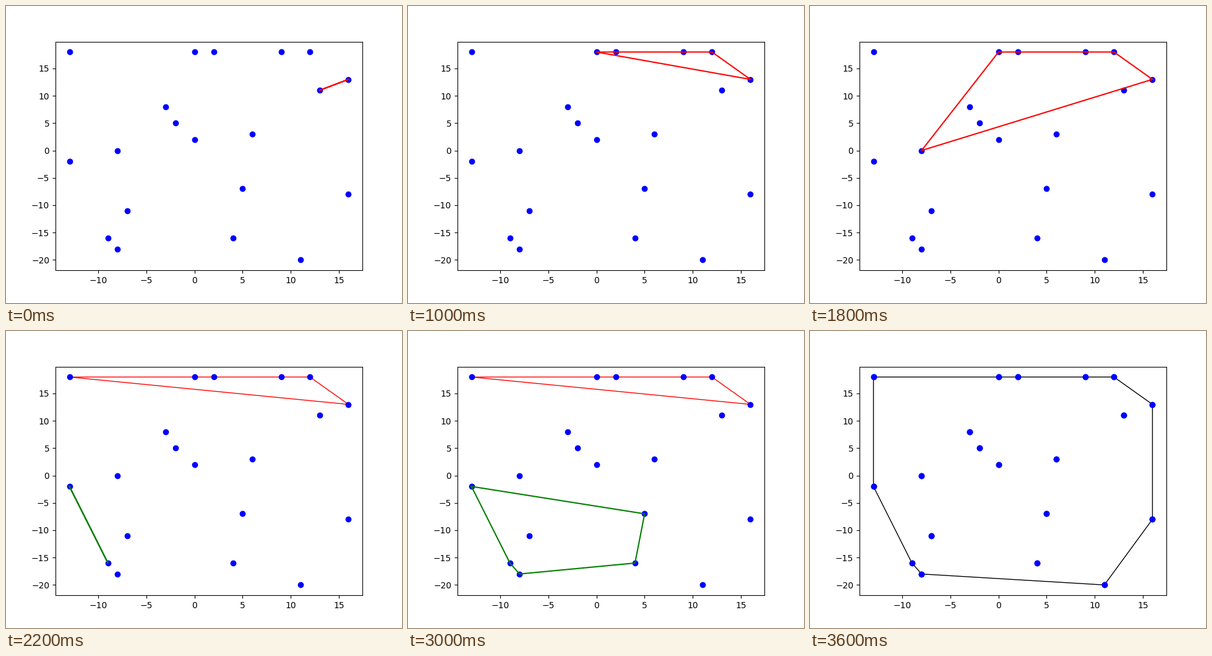
These frames come from a looping animation (640x480 px, 3800 ms). A matplotlib script:

```python
import matplotlib.pyplot as plt
from matplotlib.animation import FuncAnimation
from matplotlib.patches import Polygon

STEP_MS = 200
LEFT, RIGHT = (-13, -2), (16, -8)
POINTS = [
    (-13, 18), (0, 18), (2, 18), (9, 18), (12, 18), (16, 13), (13, 11),
    (-3, 8), (-2, 5), (0, 2), (6, 3), (-8, 0), LEFT, (5, -7), (-7, -11),
    RIGHT, (-9, -16), (-8, -18), (4, -16), (11, -20),
]


def cross(o, a, b):
    return (a[0] - o[0]) * (b[1] - o[1]) - (a[1] - o[1]) * (b[0] - o[0])


def chain_steps(points):
    """Return the half hull after each added point, from the second one on."""
    hull, steps = [], []
    for p in points:
        while len(hull) > 1 and cross(hull[-2], hull[-1], p) < 0:
            hull.pop()
        hull.append(p)
        steps.append(list(hull))
    return steps[1:]


above = [p for p in POINTS if cross(LEFT, RIGHT, p) > 0]
below = [p for p in POINTS if cross(LEFT, RIGHT, p) <= 0]
upper = chain_steps(sorted(above, reverse=True))
lower = chain_steps(sorted(below))
total = len(upper) + len(lower) + 1

fig, ax = plt.subplots(figsize=(6.4, 4.8), dpi=100)
xs, ys = zip(*POINTS)
ax.plot(xs, ys, "bo")
ax.set_xlim(-14.45, 17.45)
ax.set_ylim(-21.9, 19.9)

# The finished hull comes with a second layer of dots.
final_dots, = ax.plot(xs, ys, "bo")
scan, = ax.plot([], [], lw=1.5)
top_half = ax.add_patch(Polygon(upper[-1], fill=False, ec="red", lw=1))
full_hull = ax.add_patch(
    Polygon(upper[-1] + lower[-1], fill=False, ec="black", lw=1))


def update(i):
    done = i == total - 1
    on_top = i < len(upper)
    top_half.set_visible(not on_top and not done)
    full_hull.set_visible(done)
    final_dots.set_visible(done)
    scan.set_visible(not done)
    if not done:
        hull = upper[i] if on_top else lower[i - len(upper)]
        scan.set_data(*zip(*hull, hull[0]))
        scan.set_color("red" if on_top else "green")
    return scan, top_half, full_hull, final_dots


anim = FuncAnimation(fig, update, frames=total, interval=STEP_MS,
                     init_func=lambda: update(0), repeat=True, repeat_delay=0)
plt.show()
```
